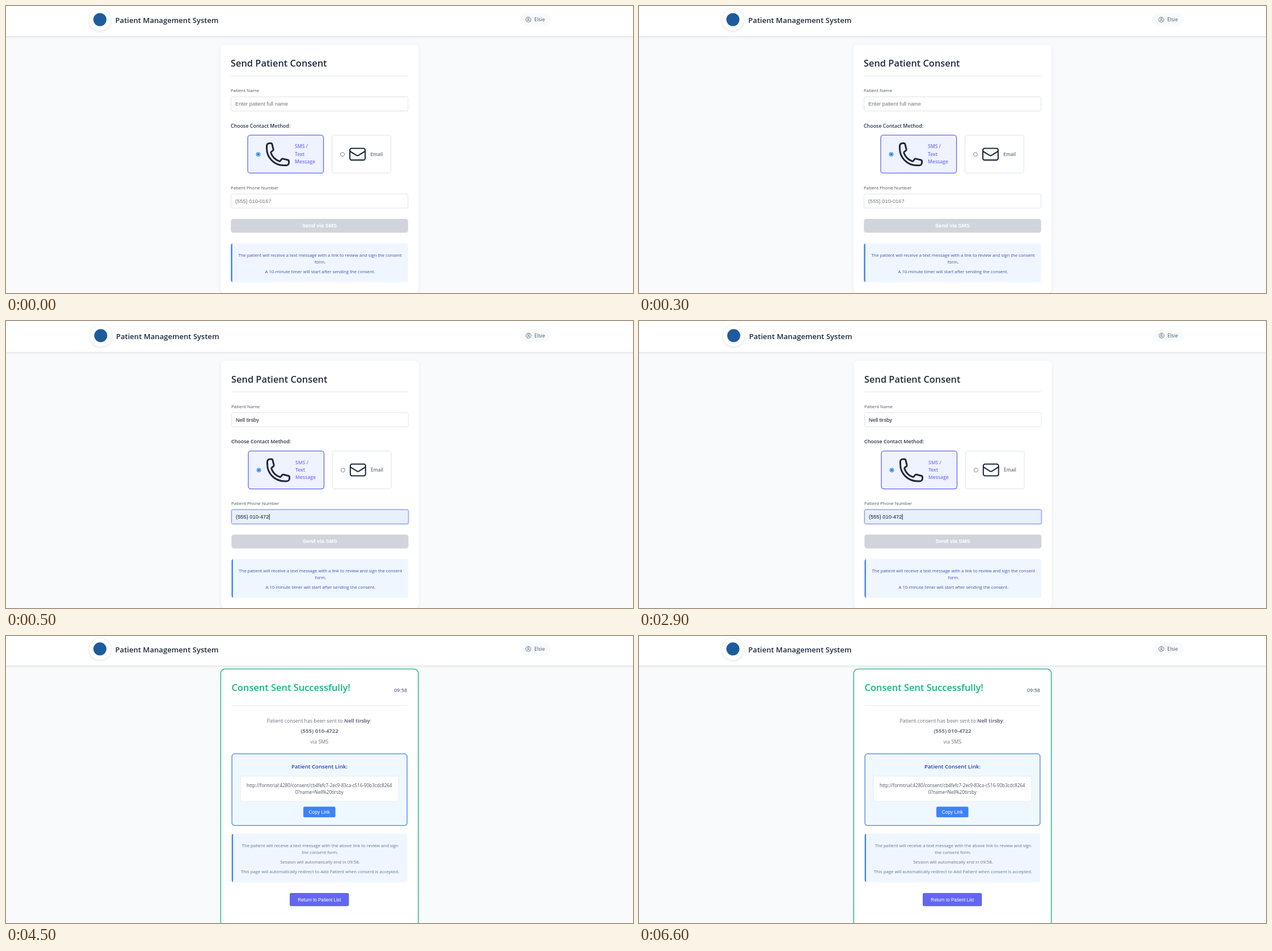
Recreate the animation shown at these times as an HTML page with a canvas. Size 1105 by 507 pixels, loop 8000 ms.

```html
<!DOCTYPE html>
<html lang="en">
<head>
<meta charset="utf-8">
<title>Patient consent</title>
<style>
html, body { margin: 0; width: 100%; height: 100%; overflow: hidden; background: #f8fafc; }
canvas { display: block; width: 1105px; height: 507px; }
</style>
</head>
<body>
<canvas id="stage" width="1105" height="507"></canvas>
<script>
const ctx = document.getElementById('stage').getContext('2d');
const LOOP = 8000, FILLED_AT = 500, SENT_AT = 4500;
const UI = '"Open Sans", "Noto Sans", sans-serif';
const ARIAL = '"Liberation Sans", Arial, sans-serif';
const INK = '#1e293b', SLATE = '#64748b', LINE = '#e2e8f0';
const INDIGO = '#6366f1', BLUE = '#3b82f6', GREEN = '#18b57e';

const user = 'Elsie', patient = 'Nell tirsby', phone = '(555) 010-4722';
const link = [
  'http://formtrial:4280/consent/cb4fefc7-2ec9-83ca-c516-90b3cdc8264',
  '0?name=Nell%20tirsby'
];

const phonePath = new Path2D('M2.25 6.75c0 8.284 6.716 15 15 15h2.25a2.25 2.25 0 0 0 2.25-2.25v-1.372c0-.516-.351-.966-.852-1.091l-4.423-1.106c-.44-.11-.902.055-1.173.417l-.97 1.293c-.282.376-.769.542-1.21.38a12.035 12.035 0 0 1-7.143-7.143c-.162-.441.004-.928.38-1.21l1.293-.97c.363-.271.527-.734.417-1.173L6.963 3.102a1.125 1.125 0 0 0-1.091-.852H4.5A2.25 2.25 0 0 0 2.25 4.5z');
const mailPath = new Path2D('M4.5 4.5h15a2.25 2.25 0 0 1 2.25 2.25v10.5a2.25 2.25 0 0 1-2.25 2.25h-15a2.25 2.25 0 0 1-2.25-2.25V6.75A2.25 2.25 0 0 1 4.5 4.5zM21.75 6.75v.243a2.25 2.25 0 0 1-1.07 1.916l-7.5 4.615a2.25 2.25 0 0 1-2.36 0L3.32 8.91a2.25 2.25 0 0 1-1.07-1.916');

function text(str, x, y, size, color, { weight = 400, font = UI, align = 'left' } = {}) {
  ctx.font = `${weight} ${size}px ${font}`;
  ctx.textAlign = align;
  ctx.fillStyle = color;
  ctx.fillText(str, x, y);
  return ctx.measureText(str).width;
}

function centered(str, x, y, size, color, opts) {
  text(str, x, y, size, color, { ...opts, align: 'center' });
}

function box(x, y, w, h, r, fill, stroke, width = 1) {
  ctx.beginPath();
  ctx.roundRect(x, y, w, h, r);
  if (fill) { ctx.fillStyle = fill; ctx.fill(); }
  if (stroke) { ctx.strokeStyle = stroke; ctx.lineWidth = width; ctx.stroke(); }
}

function circle(x, y, r, fill, stroke, width = 1) {
  box(x - r, y - r, 2 * r, 2 * r, r, fill, stroke, width);
}

function shadowed(color, blur, dy, draw) {
  ctx.save();
  ctx.shadowColor = color;
  ctx.shadowBlur = blur;
  ctx.shadowOffsetY = dy;
  draw();
  ctx.restore();
}

function icon(path, x, y, scale) {
  ctx.save();
  ctx.translate(x, y);
  ctx.scale(scale, scale);
  ctx.strokeStyle = INK;
  ctx.lineWidth = 1.5;
  ctx.lineJoin = ctx.lineCap = 'round';
  ctx.stroke(path);
  ctx.restore();
}

function rule(x, y, w) {
  ctx.fillStyle = LINE;
  ctx.fillRect(x, y, w, 1.2);
}

function notice(x, y, w, h) {
  ctx.save();
  ctx.beginPath();
  ctx.roundRect(x, y, w, h, 4.5);
  ctx.clip();
  ctx.fillStyle = '#eff6ff';
  ctx.fillRect(x, y, w, h);
  ctx.fillStyle = BLUE;
  ctx.fillRect(x, y, 2.6, h);
  ctx.restore();
}

function header(dy) {
  ctx.save();
  ctx.translate(0, dy);
  shadowed('rgba(15,23,42,.13)', 4, 1, () => {
    ctx.fillStyle = '#fff';
    ctx.fillRect(-20, -20, 1150, 73);
  });
  shadowed('rgba(15,23,42,.14)', 5, 1, () => circle(165.5, 24.5, 19, '#fff'));
  circle(165.5, 24, 11.5, '#1c5c9c');
  text('Patient Management System', 192.5, 29.8, 13.1, INK, { weight: 600 });
  box(905, 12.5, 55, 23, 11.5, '#f8fafc');
  circle(920.5, 24, 4.5, null, SLATE, 0.9);
  circle(920.5, 22.7, 1.6, null, SLATE, 0.9);
  ctx.beginPath();
  ctx.arc(920.5, 28.3, 3.2, Math.PI * 1.12, Math.PI * 1.88);
  ctx.stroke();
  text(user, 931, 27.2, 8.9, '#475569');
  ctx.restore();
}

function field(y, value, hint, focused) {
  if (focused) box(395.5, y - 0.8, 314, 26.8, 3.5, null, 'rgba(99,102,241,.22)', 1.5);
  box(396.5, y, 312, 25, 2.5, focused ? '#e8f0fe' : '#fff', focused ? '#7f8cf0' : '#e0e3e8');
  const w = text(value || hint, 404, y + 15.6, 9.3, value ? '#111827' : '#757575', { font: ARIAL });
  if (focused) {
    ctx.fillStyle = '#111';
    ctx.fillRect(404.3 + w, y + 7.5, 0.9, 10.5);
  }
}

function form(filled) {
  shadowed('rgba(15,23,42,.06)', 8, 2, () => box(378, 68.5, 349, 438.5, 7, '#fff'));
  text('Send Patient Consent', 396, 107.2, 16.4, INK, { weight: 600 });
  rule(396.3, 122.9, 312.4);

  text('Patient Name', 396, 152, 7.9, '#4b5563');
  field(160.5, filled && patient, 'Enter patient full name');

  text('Choose Contact Method:', 396, 214.7, 8.9, '#273449', { weight: 600 });
  box(426, 228.2, 133.6, 67, 4.5, '#eff2ff', INDIGO, 1.3);
  circle(444.5, 262, 3.5, '#fff', '#0b76f5', 1);
  circle(444.5, 262, 2.2, '#0b76f5');
  icon(phonePath, 455, 238, 2);
  ['SMS /', 'Text', 'Message'].forEach((s, i) =>
    text(s, 509, 251.3 + i * 13.4, 8.6, '#7477f2', { weight: 600 }));

  box(574.5, 228.2, 103.8, 67, 4.5, '#fff', LINE, 1.3);
  circle(593, 262, 3.5, '#fff', '#767676', 0.9);
  icon(mailPath, 602.9, 245.2, 1.38);
  text('Email', 642, 265, 8.4, SLATE, { weight: 600 });

  text('Patient Phone Number', 396, 323.7, 7.9, '#4b5563');
  field(332, filled && phone.slice(0, -1), '(555) 010-0167', filled);

  box(396.3, 376, 312.4, 24.5, 4.5, '#d1d5db');
  centered('Send via SMS', 552.4, 391.2, 9.3, '#fff', { weight: 700, font: ARIAL });

  notice(396.2, 419, 312.5, 69.2);
  const tone = '#3552b0';
  centered('The patient will receive a text message with a link to review and sign the consent', 553.5, 442.6, 7.74, tone);
  centered('form.', 553.5, 454.6, 7.74, tone);
  centered('A 10-minute timer will start after sending the consent.', 553.5, 471.6, 7.74, tone);
}

function success() {
  box(378.4, 58.4, 348.2, 470, 7, '#fff', GREEN, 1.4);
  text('Consent Sent Successfully!', 397.5, 97.2, 16.45, GREEN, { weight: 600 });
  text('09:58', 707, 99.2, 9, SLATE, { weight: 600, align: 'right' });
  rule(397.5, 122.2, 310);

  const grey = '#6b7280';
  let x = 459.5;
  x += text('Patient consent has been sent to ', x, 152.6, 8.8, grey);
  x += text(patient, x, 152.6, 8.9, grey, { weight: 700 });
  text(':', x, 152.6, 8.8, grey);
  centered(phone, 552.5, 171.2, 9.5, grey, { weight: 700 });
  centered('via SMS', 552.3, 189.8, 8.9, grey);

  box(398.2, 208.2, 308.6, 126.4, 4.5, '#f0f8ff', BLUE, 1.3);
  centered('Patient Consent Link:', 552.5, 233.8, 9.65, '#1e40af', { weight: 600 });
  box(413.2, 247.5, 278.8, 44.5, 2.5, '#fff', LINE, 0.8);
  link.forEach((s, i) => centered(s, 552.2, 266.7 + i * 12, 8.03, '#4b5563'));
  box(524, 301.5, 56.5, 18.8, 2.5, BLUE);
  centered('Copy Link', 552.2, 313.9, 8.45, '#fff', { font: ARIAL });

  notice(397.5, 349, 310, 86.2);
  [
    ['The patient will receive a text message with the above link to review and sign', 372.6],
    ['the consent form.', 384.6],
    ['Session will automatically end in 09:58.', 401.6],
    ['This page will automatically redirect to Add Patient when consent is accepted.', 418.6]
  ].forEach(([s, y]) => centered(s, 553.5, y, 7.75, SLATE));

  box(500, 454, 104.3, 23.3, 2.8, INDIGO);
  centered('Return to Patient List', 552.2, 468.6, 8.15, '#fff', { font: ARIAL });
}

function draw(t) {
  ctx.setTransform(1, 0, 0, 1, 0, 0);
  ctx.fillStyle = '#f8fafc';
  ctx.fillRect(0, 0, 1105, 507);
  if (t >= SENT_AT) {
    header(-1.2);
    success();
    return;
  }
  const filled = t >= FILLED_AT;
  // The page sits slightly lower and smaller once it is filled in.
  if (filled) ctx.setTransform(0.9985, 0, 0, 0.9985, 1.7, 1.8);
  header(0);
  form(filled);
}

const start = performance.now();
function tick() {
  draw((performance.now() - start) % LOOP);
  requestAnimationFrame(tick);
}
tick();
</script>
</body>
</html>
```
